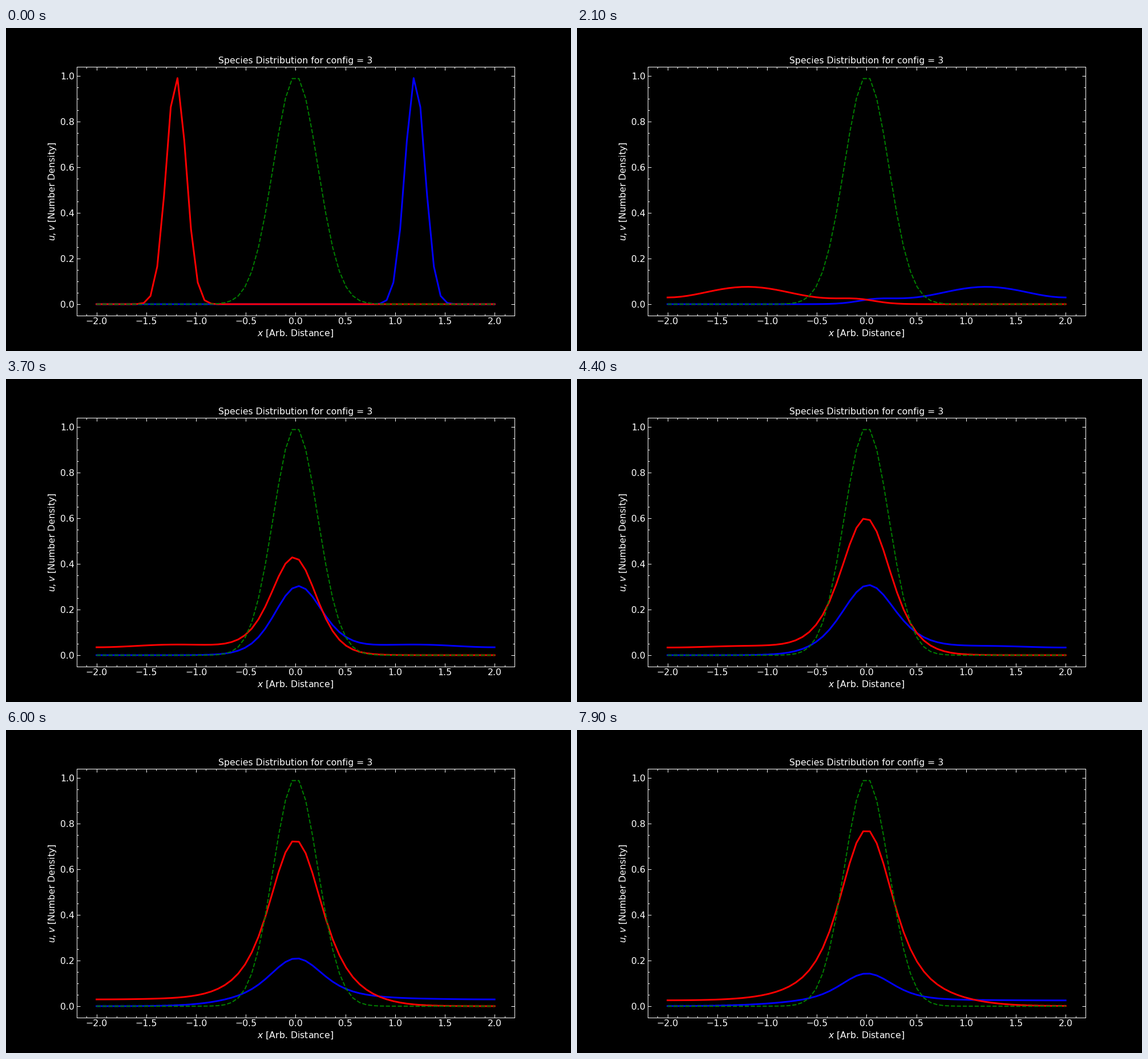
A matplotlib script for the animation above (8 s loop, 990 by 566 pixels).

```python
import numpy as np
import matplotlib.pyplot as plt
from matplotlib.animation import FuncAnimation

FRAMES, INTERVAL = 80, 100
DPI = 141.5
PX = 72 / DPI               # one pixel in points
N = 60                      # grid points
D = 0.01                    # diffusion
A_UV, A_VU = 0.5, 1.0       # competition felt by u and by v
T_FRAME, SUBSTEPS = 0.35, 5

plt.style.use("dark_background")
plt.rcParams.update({
    "font.family": "DejaVu Sans",
    "font.size": 8,
    "axes.titlesize": 8,
    "axes.labelsize": 8,
    "axes.linewidth": 0.5,
    "axes.titlepad": 6 * PX,
    "axes.labelpad": 4 * PX,
})
for axis in ("xtick", "ytick"):
    plt.rcParams.update({
        f"{axis}.labelsize": 8,
        f"{axis}.direction": "in",
        f"{axis}.major.size": 3,
        f"{axis}.minor.size": 1.5,
        f"{axis}.major.width": 0.5,
        f"{axis}.minor.width": 0.5,
        f"{axis}.major.pad": 3.5 * PX,
        f"{axis}.minor.visible": True,
    })
plt.rcParams.update({"xtick.top": True, "ytick.right": True})

x = np.linspace(-2, 2, N)
dx = x[1] - x[0]
capacity = np.exp(-10 * x**2)


def laplacian(f):
    """Second difference, mirrored at both ends."""
    p = np.pad(f, 1, mode="reflect")
    return (p[2:] - 2 * f + p[:-2]) / dx**2


def rate(state):
    """Two competing, diffusing species sharing one niche."""
    u, v = state
    return np.array([
        D * laplacian(u) + u * (capacity - u - A_UV * v),
        D * laplacian(v) + v * (capacity - v - A_VU * u),
    ])


def rk4(s, dt):
    k1 = rate(s)
    k2 = rate(s + dt / 2 * k1)
    k3 = rate(s + dt / 2 * k2)
    k4 = rate(s + dt * k3)
    return s + dt / 6 * (k1 + 2 * k2 + 2 * k3 + k4)


def solve():
    s = np.array([np.exp(-50 * (x + 1.2)**2), np.exp(-50 * (x - 1.2)**2)])
    states = [s]
    for _ in range(FRAMES - 1):
        for _ in range(SUBSTEPS):
            s = rk4(s, T_FRAME / SUBSTEPS)
        states.append(s)
    return states


states = solve()

fig, ax = plt.subplots(figsize=(990 / DPI, 566 / DPI), dpi=DPI)
line_v, = ax.plot(x, states[0][1], color="blue", lw=1.5)
line_u, = ax.plot(x, states[0][0], color="red", lw=1.5)
ax.plot(x, capacity, color="green", ls="--", lw=1)

ax.set_title("Species Distribution for config = 3")
ax.set_xlabel(r"$x$ [Arb. Distance]")
ax.set_ylabel(r"$u, v$ [Number Density]")
ax.set_xlim(ax.get_xlim())
ax.set_ylim(ax.get_ylim())


def update(i):
    u, v = states[i]
    line_u.set_ydata(u)
    line_v.set_ydata(v)
    return line_u, line_v


anim = FuncAnimation(fig, update, frames=FRAMES, interval=INTERVAL,
                     repeat=True, repeat_delay=0, blit=False)
plt.show()
```
